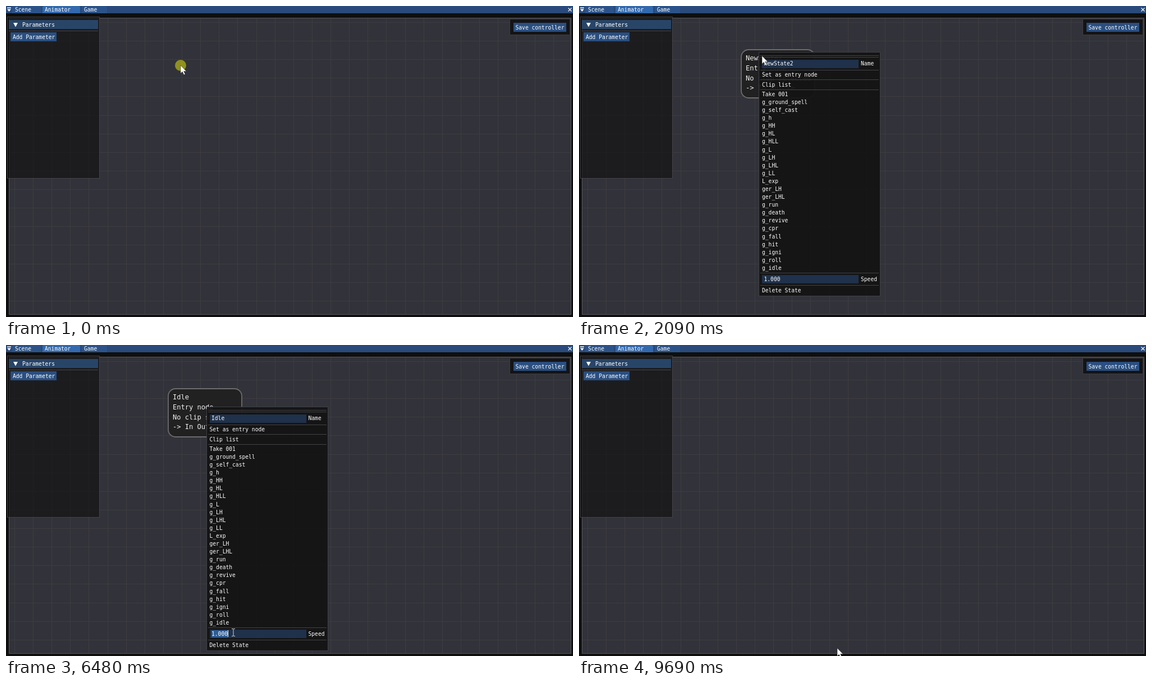
Write an HTML page that moves like this. It is 1010 px wide and 555 px high and loops after 9730 ms.

```html
<!DOCTYPE html>
<html lang="en">
<head>
<meta charset="utf-8">
<title>Animator</title>
<style>
  html, body { margin: 0; width: 100%; height: 100%; overflow: hidden; background: #0f0f0f; }
  svg { display: block; width: 1010px; height: 555px; }
  text { font: 9.63px "DejaVu Sans Mono", "Noto Sans Mono", monospace; fill: #fff; white-space: pre; }
  .big text { font-size: 12.05px; fill: #f0f0f0; }
  rect.sharp { shape-rendering: crispEdges; }
</style>
</head>
<body>
<svg id="stage" width="1010" height="555" viewBox="0 0 1010 555"></svg>
<script>
const LOOP = 9730;
const CHAR = 5.8;
const BLUE = '#4296fa';
const stage = document.getElementById('stage');

function add(parent, tag, attrs) {
  const el = document.createElementNS('http://www.w3.org/2000/svg', tag);
  set(el, attrs);
  parent.appendChild(el);
  return el;
}
function set(el, attrs) {
  for (const key in attrs) el.setAttribute(key, attrs[key]);
}
function show(el, on) {
  el.style.display = on ? '' : 'none';
}
function box(parent, x, y, w, h, fill, more) {
  return add(parent, 'rect', { x, y, width: w, height: h, fill, class: 'sharp', ...more });
}
function label(parent, x, mid, str, drop = 3.5) {
  const el = add(parent, 'text', { x, y: mid + drop });
  el.textContent = str;
  return el;
}
function frame(parent, x, y, w, h, fill, stroke) {
  return box(parent, x + .5, y + .5, w - 1, h - 1, fill, { stroke });
}

// Window chrome
box(stage, 0, 0, 1010, 555, '#0f0f0f');
box(stage, 0, 0, 1010, 13, '#294a7a');
const tab = (x, w, fill) => add(stage, 'path', {
  d: `M${x} 13V3q0-3 3-3h${w - 6}q3 0 3 3v10z`, fill
});
tab(11, 51, '#2b5389');
tab(65, 67, '#3369ad');
tab(135, 45, '#2b5389');
label(stage, 16, 6.5, 'Scene');
label(stage, 69, 6.5, 'Animator');
label(stage, 139, 6.5, 'Game');
add(stage, 'path', { d: 'M2 2.5h7v1.5h-7zM2 5.5h7l-3.5 4.5z', fill: '#fff' });
add(stage, 'path', { d: 'M1001.5 3.5l6 6m0-6l-6 6', stroke: '#fff', 'stroke-width': 1.1 });

// Graph area
frame(stage, 5, 21, 1002, 530, '#32323a', '#58585c');
for (let i = 0; i < 30; i++) box(stage, Math.round(15 + i * 33.12), 22, 1, 528, '#3c3c41');
for (let i = 0; i < 16; i++) box(stage, 6, Math.round(29 + i * 33.12), 1000, 1, '#3c3c41');

const node = add(stage, 'g', { class: 'big' });
const nodeBox = add(node, 'rect', { x: 289, y: 78, height: 86, rx: 13, fill: '#212122' });
const nodeText = ['', 'Entry node', '', '-> In Out ->'].map((s, i) => label(node, 297, 93 + i * 17.6, s, 4.4));

// Parameters panel
frame(stage, 2, 19, 165, 289, 'rgba(15,15,15,.62)', '#424247');
box(stage, 5, 25, 159, 16, '#284568');
add(stage, 'path', { d: 'M13 30h8l-4 7.5z', fill: '#fff' });
label(stage, 29, 33, 'Parameters');
box(stage, 5, 44, 159, 1, '#454549');
box(stage, 8, 47, 82, 16, '#2a4f80');
label(stage, 12, 55.5, 'Add Parameter');

frame(stage, 897, 23, 108, 29, '#141416', '#3c3c40');
box(stage, 904, 30, 94, 16, '#2a4f80');
label(stage, 907.5, 38, 'Save controller');

// State popup, drawn at its own origin
const clips = ('Take 001,g_ground_spell,g_self_cast,g_h,g_HH,g_HL,g_HLL,g_L,g_LH,g_LHL,g_LL,L_exp,' +
  'ger_LH,ger_LHL,g_run,g_death,g_revive,g_cpr,g_fall,g_hit,g_igni,g_roll,g_idle').split(',');
const rows = [['Set as entry node', 40.7]]
  .concat(clips.map((s, i) => [s, 75.4 + i * 14.09]), [['Delete State', 425]]);

const popup = add(stage, 'g', {});
frame(popup, 0, 0, 217, 436, 'rgba(20,20,20,.94)', '#404046');
for (const y of [6, 9, 32, 49, 67, 394, 416]) box(popup, 3, y, 211, 1, '#434347');
const rowLight = box(popup, 2.5, 0, 211, 14, BLUE);
label(popup, 6, 58, 'Clip list');
for (const [s, mid] of rows) label(popup, 6, mid, s);

function field(mid, name) {
  box(popup, 6, mid - 7, 172, 15, '#1f314b');
  const sel = box(popup, 9.5, mid - 6, 0, 13, '#2f5c94');
  const text = label(popup, 9.5, mid, '');
  const caret = box(popup, 0, mid - 6, 1, 12, '#fff');
  label(popup, 182, mid, name);
  return { sel, text, caret };
}
const nameField = field(20.8, 'Name');
const speedField = field(405, 'Speed');

function fill(f, str, from, to, caret) {
  f.text.textContent = str;
  set(f.sel, { x: 9.5 + from * CHAR, width: (to - from) * CHAR });
  show(f.caret, caret >= 0);
  set(f.caret, { x: 9.5 + caret * CHAR });
}

// Pointer
const ring = add(stage, 'circle', { r: 10, fill: 'rgba(255,255,0,.46)' });
const arrow = add(stage, 'path', {
  d: 'M0 0v14.2l3.2-3 2.7 5.6 2.3-1.1-2.6-5.3h4.6z',
  fill: '#fff', stroke: '#222', 'stroke-width': .5
});
const beam = add(stage, 'path', {
  d: 'M-3 -6.5h2.3l.7.7.7-.7h2.3M0 -6v12M-3 6.5h2.3l.7-.7.7.7h2.3',
  fill: 'none', stroke: '#d8d8d8', 'stroke-width': 1
});

// time, x, y of the pointer tip
const path = [
  [0, 311, 106], [90, 311, 106], [600, 330, 120], [1040, 352, 117], [1130, 352, 117],
  [1470, 321, 83], [1520, 319.5, 81], [1850, 320, 82], [1940, 320, 82], [2040, 326, 89],
  [2090, 326, 89], [2480, 430, 101], [2620, 430, 101], [2850, 330, 97], [2900, 330, 97],
  [3140, 554, 110], [5100, 554, 110], [5150, 545, 110], [5400, 357, 110], [5510, 357, 110],
  [5860, 399, 512], [6340, 399, 512], [6480, 405, 513], [6720, 405, 513], [6910, 463, 522],
  [7370, 463, 522], [7980, 416, 498], [8400, 416, 498], [8860, 358, 119], [9350, 358, 119],
  [9600, 460, 541], [LOOP, 460, 541]
];
const presses = [[0, 90], [1090, 1130], [1850, 1940], [2620, 2880], [5420, 5510],
  [6050, 6090], [6130, 6200], [8310, 8400], [8950, 9040], [9620, 9690]];
const popups = [[1940, 4450, 320, 82], [5510, 8400, 356.5, 110], [9040, 9690, 357.5, 119]];
const nameTyped = [[0, 'NewState2'], [3840, 'I'], [4130, 'Id'], [4220, 'Idl'], [4360, 'Idle']];
const speedTyped = [[0, '1.000'], [6720, '2'], [7370, '2.000']];

const during = (list, t) => list.find(([a, b]) => t >= a && t < b);
const latest = (list, t) => list.filter(([a]) => a <= t).pop()[1];

function pointer(t) {
  const i = path.findIndex(p => p[0] > t);
  const [t0, x0, y0] = path[i - 1], [t1, x1, y1] = path[i];
  const k = .5 - Math.cos(Math.PI * (t - t0) / (t1 - t0)) / 2;
  return [x0 + (x1 - x0) * k, y0 + (y1 - y0) * k];
}

function draw(t) {
  const [x, y] = pointer(t);
  const open = during(popups, t);
  const press = during(presses, t);
  let typing = false;

  // Node
  const clipSet = t >= 8400;
  const width = clipSet ? 102 : 131;
  const hot = !open && x > 289 && x < 289 + width && y > 78 && y < 164;
  show(node, t >= 1130 && t < 9690);
  set(nodeBox, { width, stroke: hot ? '#4a9dcb' : '#6c6c6c', 'stroke-width': hot ? 2.8 : 1.8 });
  nodeText[0].textContent = t < 4450 ? 'NewState2' : 'Idle';
  nodeText[2].textContent = clipSet ? 'g_idle' : 'No clip selected';

  // Popup
  show(popup, open);
  if (open) {
    const [, , ox, oy] = open;
    const px = x - ox, py = y - oy;
    set(popup, { transform: `translate(${ox} ${oy})` });

    const row = rows.find(r => Math.abs(py - r[1]) < 7);
    const over = row && px > 2 && px < 214;
    show(rowLight, over);
    if (over) set(rowLight, { y: row[1] - 7, opacity: press ? 1 : .8 });

    const str = latest(nameTyped, t);
    let from = 0, to = 0, caret = -1;
    if (t >= 2620 && t < 3840) {
      to = str.length;
      from = t < 2850 ? Math.max(0, Math.min(to, Math.round((px - 9.5) / CHAR))) : 0;
      caret = from;
    } else if (t >= 3840 && t < 4450) {
      caret = str.length;
    }
    fill(nameField, str, from, to, caret);

    const num = latest(speedTyped, t);
    const marked = t >= 6100 && t < 6720;
    const editing = t >= 6050 && t < 7370;
    fill(speedField, num, 0, marked ? num.length : 0, editing ? num.length : -1);

    typing = px > 6 && px < 178 && (py > 13 && py < 29 || py > 397 && py < 413);
  }

  // Pointer
  const at = { transform: `translate(${x} ${y})` };
  show(ring, press);
  show(arrow, !typing);
  show(beam, typing);
  for (const el of [ring, arrow, beam]) set(el, at);
}

const start = performance.now();
function tick() {
  draw((performance.now() - start) % LOOP);
  requestAnimationFrame(tick);
}
tick();
</script>
</body>
</html>
```
